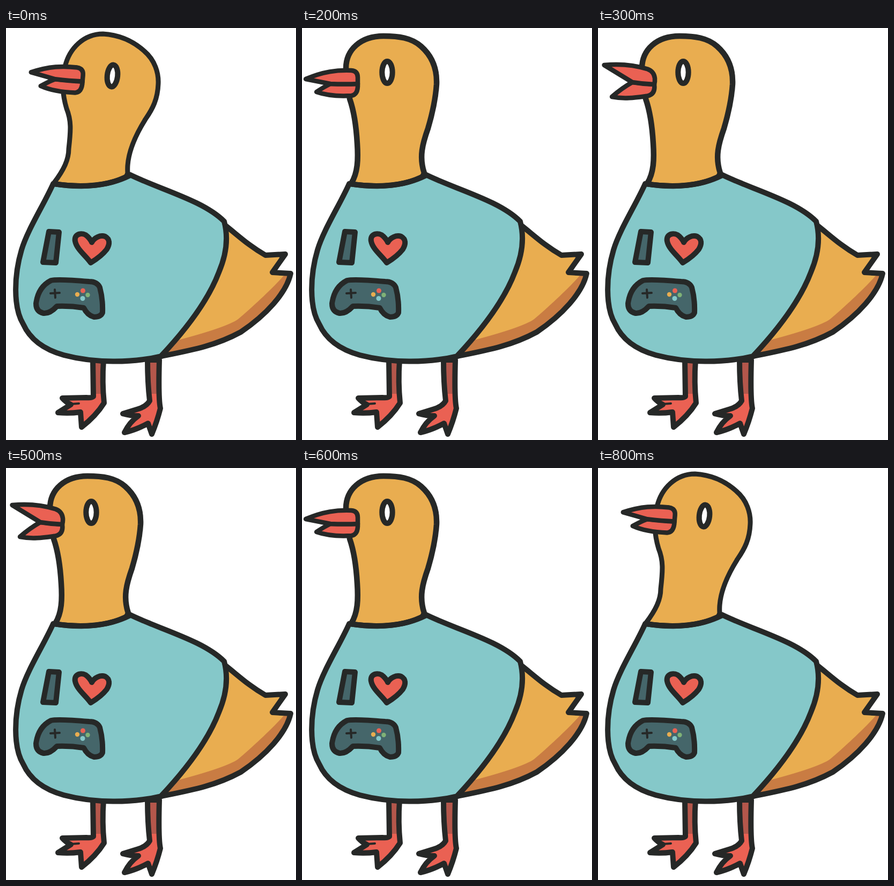
Animation, 541 px wide and 767 px high, one loop 1.2 s. Source, as an HTML page:

```html
<!DOCTYPE html>
<html lang="en">
<head>
<meta charset="utf-8">
<title>Talking bird</title>
<style>
  html, body { margin: 0; width: 100%; height: 100%; overflow: hidden; background: #fff; }
  svg { display: block; width: 541px; height: 767px; }
  .ink { stroke: #262827; stroke-width: 10; stroke-linejoin: round; stroke-linecap: round; }
  .skin { fill: #e9ad50; }
  .red { fill: #ea6153; }
  .slate { fill: #45666a; }
  .none { fill: none; }
  .beak { stroke-width: 8.5; }
  .thin { stroke-width: 4; }
</style>
</head>
<body>
<svg viewBox="0 0 541 767">
  <defs>
    <linearGradient id="leg" gradientUnits="userSpaceOnUse" x1="0" y1="676" x2="0" y2="686">
      <stop offset="0.45" stop-color="#b4574b"/>
      <stop offset="0.55" stop-color="#ea6153"/>
    </linearGradient>
    <path id="tail" d="M411 369 C435 388 454 406 484 423 L521 421 L497 455 L531 457 C523 494 484 535 438 566 C390 592 345 600 290 611"/>
  </defs>

  <!-- legs -->
  <g class="ink" fill="url(#leg)">
    <path d="M162 618 L163 686 Q160 689 150 688 L105 689 Q112 697 121 701 L97 716 Q118 718 139 715 L141 743 Q168 722 183 698 Q179 660 182 618Z"/>
    <path d="M264 618 Q264 660 268 694 Q262 705 244 710 L218 718 Q232 722 247 722 Q230 734 221 753 Q243 748 265 736 L272 756 Q282 732 288 708 Q284 690 286 618Z"/>
  </g>
  <path class="ink none thin" d="M122 700 L136 699"/>

  <!-- tail -->
  <use href="#tail" class="skin"/>
  <path fill="#c97c43" d="M531 459 L519 460 C503 479 467 513 433 542 Q412 557 321 581 L290 611 C345 600 390 592 438 566 C484 535 523 494 531 459Z"/>
  <use href="#tail" class="ink none"/>

  <!-- head -->
  <path class="ink skin" id="head"/>
  <g id="beak">
    <path class="ink red beak" id="lower"/>
    <path class="ink red beak" id="upper"/>
  </g>
  <ellipse class="ink" id="eye" rx="9.7" ry="20.5" fill="#fff"/>

  <!-- shirt -->
  <path class="ink" fill="#85c8c9" d="M88 290 C70 330 40 376 29 413 C15 460 13 520 32 551 C45 580 72 599 108 609 C165 624 235 624 289 611 C337 560 378 505 397 455 C412 420 415 390 407 360 C368 321 288 301 231 273 C190 297 135 297 88 290Z"/>
  <path class="ink none" d="M90 290 C135 297 188 296 230 275"/>

  <!-- print -->
  <path class="ink slate" d="M80 379 L99 380 L93 437 L69 436Z"/>
  <path class="ink red" d="M158 437 C149 424 132 412 129 397 C126 383 143 379 152 388 Q158 394 160 399 C165 390 176 385 185 388 C194 393 194 402 188 412 Q178 425 158 437Z"/>
  <path class="ink slate" d="M84 470 Q97 467 155 472 Q170 472 175 483 Q181 505 180 530 Q177 538 164 538 Q152 535 145 521 Q120 517 95 518 Q82 532 70 531 Q56 528 56 513 Q60 482 84 470Z"/>
  <path class="ink none thin" d="M91 487 L92 502 M83 494 L100 493"/>
  <circle cx="143.5" cy="489" r="4.5" fill="#ea6153"/>
  <circle cx="133" cy="496" r="4.2" fill="#e9ad50"/>
  <circle cx="152.5" cy="497" r="4.2" fill="#7fb277"/>
  <circle cx="143" cy="503.5" r="4.5" fill="#85c8c9"/>
</svg>
<script>
const $ = id => document.getElementById(id);

const poses = {
  rest: {
    head: "M89 289 C108 264 117 245 117 225 C121 190 122 172 113 150 Q107 130 106 110 L110 72 C118 38 145 11 181 11 C214 13 238 25 258 43 C278 60 285 84 284 104 C283 132 274 150 260 170 C245 194 224 232 227 270",
    eye: "translate(198.5 89) rotate(6)",
    beak: "translate(39 -4.5) rotate(4.8 104 100)",
    width: 9
  },
  mid: {
    head: "M89 289 C104 263 112 245 111 222 C111 195 111 178 103 160 Q92 138 90 120 L91 70 C95 34 120 5 156 6 C190 8 216 18 238 36 C260 56 265 82 264 100 C263 128 253 147 245 166 C231 200 218 236 228 270",
    eye: "translate(177 80.5) rotate(1)",
    beak: "translate(20 -3)",
    width: 9
  },
  lean: {
    head: "M92 289 C104 270 105 245 103 215 C101 180 97 155 89 132 L82 75 C82 40 110 15 152 15 C180 15 204 18 222 34 C246 55 252 82 251 105 C249 135 243 160 235 187 C225 215 218 240 228 270",
    eye: "translate(159 82.5)",
    beak: "",
    width: 10.5
  }
};
const neckBase = "L215 300 L105 300Z"; // hidden behind the shirt

// Each part: path commands, then its closed and open points
const beak = {
  upper: ["MCQQQ",
    [7,95, 40,81, 65,78, 92,79, 104,80, 104,92, 104,98, 104,104, 80,105, 53,104],
    [16,43, 48,51, 72,60, 93,74, 105,82, 108,95, 109,101, 106,106, 90,104, 75,98]],
  lower: ["MQCQ",
    [53,104, 42,109, 27,119, 50,127, 75,127, 92,126, 105,124, 104,104],
    [75,98, 48,114, 25,137, 50,139, 72,131, 93,127, 110,122, 106,106]]
};
const count = { M: 2, Q: 4, C: 6 };

function blend([cmds, a, b], k) {
  let i = 0;
  return [...cmds].map(c => {
    const from = i;
    i += count[c];
    return c + a.slice(from, i).map((v, j) => v + (b[from + j] - v) * k).join(" ");
  }).join("") + "Z";
}

// [start ms, pose, beak opening]
const steps = [
  [0, "rest", 0], [100, "mid", 0], [200, "lean", 0], [300, "lean", 0.5],
  [400, "lean", 1], [500, "lean", 0.5], [600, "lean", 0], [700, "mid", 0],
  [800, "rest", 0]
];

function draw(time) {
  const t = time % 1200;
  const [, name, open] = steps.filter(s => s[0] <= t).pop();
  const pose = poses[name];
  $("head").setAttribute("d", pose.head + neckBase);
  $("head").style.strokeWidth = pose.width;
  $("eye").setAttribute("transform", pose.eye);
  $("beak").setAttribute("transform", pose.beak);
  for (const part in beak) $(part).setAttribute("d", blend(beak[part], open));
}

const start = performance.now();
function tick() {
  draw(performance.now() - start);
  requestAnimationFrame(tick);
}
tick();
</script>
</body>
</html>
```
